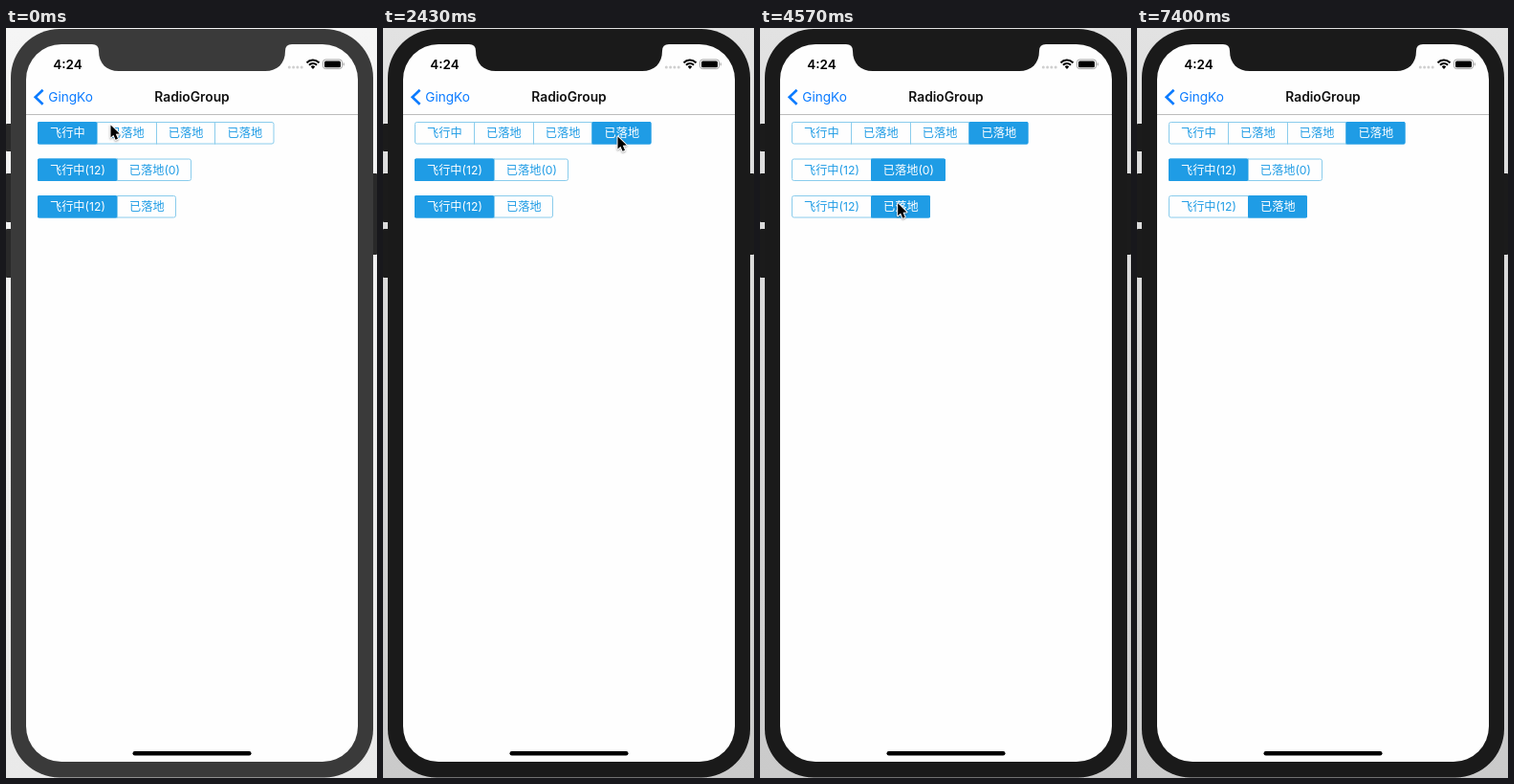
Write an HTML page with a canvas that moves like this. It is 388 by 784 pixels and loops after 7430 ms.

```html
<!DOCTYPE html>
<html lang="zh">
<head>
<meta charset="utf-8">
<title>RadioGroup</title>
<style>
  html, body { margin: 0; width: 100%; height: 100%; overflow: hidden; background: #fff; }
  canvas { display: block; width: 388px; height: 784px; }
</style>
</head>
<body>
<canvas id="stage"></canvas>
<script>
const W = 388, H = 784, LOOP = 7430;
const BLUE = '#1f9ce5', BORDER = '#8accec', TINT = '#0b7bff';
const LATIN = 'Inter, "Noto Sans", sans-serif';
const LABEL = '12.2px Inter, "Noto Sans CJK SC", "Noto Sans CJK", sans-serif';
const ACTIVATE_AT = 280;

const canvas = document.getElementById('stage');
const ctx = canvas.getContext('2d');
const ratio = window.devicePixelRatio || 1;
canvas.width = W * ratio;
canvas.height = H * ratio;

// picks: [time, selected index]
const groups = [
  { y: 98, edges: [33, 95, 157, 218.5, 280.5], labels: ['飞行中', '已落地', '已落地', '已落地'],
    picks: [[0, 0], [480, 1], [1230, 2], [1980, 3]] },
  { y: 136.5, edges: [33, 116, 194], labels: ['飞行中(12)', '已落地(0)'],
    picks: [[0, 0], [3430, 1], [5500, 0]] },
  { y: 175, edges: [33, 116, 178], labels: ['飞行中(12)', '已落地'],
    picks: [[0, 0], [4330, 1]] }
];

// pointer stops: [time, x, y]
const pointerPath = [
  [0, 109, 101], [120, 110, 105], [560, 112, 107], [930, 170, 110], [1350, 178, 112],
  [1800, 240, 113], [2430, 245, 113], [2650, 243, 115], [3080, 172, 145],
  [3550, 155, 147], [3900, 155, 163], [4130, 146, 182], [4550, 144, 183],
  [5030, 86, 157], [5300, 77, 144], [5770, 77, 142], [5880, 76, 143], [6130, -16, 170]
];

function box(x, y, w, h, r, fill) {
  ctx.beginPath();
  ctx.roundRect(x, y, w, h, r);
  ctx.fillStyle = fill;
  ctx.fill();
}

function text(str, x, y, font, color, align = 'center') {
  ctx.font = font;
  ctx.fillStyle = color;
  ctx.textAlign = align;
  ctx.fillText(str, x, y);
}

function drawPhone(active) {
  const back = ctx.createLinearGradient(0, 0, 0, H);
  back.addColorStop(0, active ? '#e2e2e2' : '#f5f5f5');
  back.addColorStop(1, active ? '#cacaca' : '#e9e9e9');
  ctx.fillStyle = back;
  ctx.fillRect(0, 0, W, H);

  const body = active ? '#1a1a1a' : '#3a3a3a';
  const button = active ? '#1b1b1b' : '#292929';
  for (const [y, h] of [[100, 29], [152, 51], [210, 51]]) box(0, y, 8, h, 1, button);
  box(381, 152, 7, 85, 1, button);
  box(5, 1, 379, 782.5, 51, body);
  box(21, 17, 347, 750, 37, '#fefefe');

  ctx.beginPath();
  ctx.moveTo(90, 16);
  ctx.lineTo(90, 17);
  ctx.quadraticCurveTo(97, 17, 97, 24);
  ctx.bezierCurveTo(97, 37, 105, 45, 118, 45);
  ctx.lineTo(271, 45);
  ctx.bezierCurveTo(284, 45, 292, 37, 292, 24);
  ctx.quadraticCurveTo(292, 17, 299, 17);
  ctx.lineTo(299, 16);
  ctx.fillStyle = body;
  ctx.fill();
}

function drawStatus() {
  text('4:24', 64.5, 43, '600 13.5px ' + LATIN, '#000');
  for (let i = 0; i < 4; i++) box(294.8 + i * 4.3, 39.5, 3, 3, 1.5, '#cfcfcf');

  ctx.strokeStyle = '#000';
  ctx.lineWidth = 2;
  for (const r of [5.5, 8.9]) {
    ctx.beginPath();
    ctx.arc(321, 42.5, r, -Math.PI * 0.76, -Math.PI * 0.24);
    ctx.stroke();
  }
  ctx.beginPath();
  ctx.moveTo(321, 43);
  ctx.arc(321, 42.5, 3, -Math.PI * 0.76, -Math.PI * 0.24);
  ctx.fillStyle = '#000';
  ctx.fill();

  ctx.beginPath();
  ctx.roundRect(331.5, 33, 20, 9.6, 2.8);
  ctx.lineWidth = 0.9;
  ctx.strokeStyle = '#999';
  ctx.stroke();
  box(333, 34.4, 17, 6.8, 1.5, '#000');
  box(352.6, 36.2, 1.2, 3.2, 0.6, '#aaa');
}

function drawHeader() {
  ctx.fillStyle = '#bcbcbc';
  ctx.fillRect(21, 90, 347, 1);
  ctx.beginPath();
  ctx.moveTo(38.6, 64.8);
  ctx.lineTo(30.7, 72.3);
  ctx.lineTo(38.6, 79.8);
  ctx.strokeStyle = TINT;
  ctx.lineWidth = 2.6;
  ctx.stroke();
  text('GingKo', 44.3, 77, '13.6px ' + LATIN, TINT, 'left');
  text('RadioGroup', 194.5, 77, '600 13.8px ' + LATIN, '#111');
}

function drawGroup({ y, edges, labels, picks }, t) {
  const selected = picks.filter(p => p[0] <= t).pop()[1];
  const left = edges[0], right = edges[edges.length - 1], height = 23.5;

  ctx.save();
  ctx.beginPath();
  ctx.roundRect(left, y, right - left, height, 2);
  ctx.clip();
  ctx.fillStyle = BLUE;
  ctx.fillRect(edges[selected], y, edges[selected + 1] - edges[selected], height);
  ctx.restore();

  ctx.strokeStyle = BORDER;
  ctx.lineWidth = 1;
  ctx.beginPath();
  ctx.roundRect(left + 0.5, y + 0.5, right - left - 1, height - 1, 2);
  for (const x of edges.slice(1, -1)) {
    ctx.moveTo(Math.floor(x) + 0.5, y);
    ctx.lineTo(Math.floor(x) + 0.5, y + height);
  }
  ctx.stroke();

  const x = edges[selected];
  box(x, y, edges[selected + 1] - x, height, 1.5, BLUE);
  labels.forEach((label, i) => {
    text(label, (edges[i] + edges[i + 1]) / 2 + 0.4, y + 16.3, LABEL, i === selected ? '#fff' : BLUE);
  });
}

function pointerAt(t) {
  const next = pointerPath.findIndex(p => p[0] > t);
  if (next < 0) return null;
  const [t0, x0, y0] = pointerPath[next - 1], [t1, x1, y1] = pointerPath[next];
  const u = (t - t0) / (t1 - t0), ease = u * u * (3 - 2 * u);
  return [x0 + (x1 - x0) * ease, y0 + (y1 - y0) * ease];
}

function drawPointer(t) {
  const at = pointerAt(t);
  if (!at) return;
  ctx.save();
  ctx.translate(at[0], at[1]);
  ctx.beginPath();
  ctx.moveTo(0.5, 0.5);
  for (const [x, y] of [[0.5, 13.4], [3.4, 10.7], [5.6, 15.8], [8, 14.8], [5.8, 9.8], [9.8, 9.6]]) {
    ctx.lineTo(x, y);
  }
  ctx.closePath();
  ctx.lineJoin = 'round';
  ctx.lineWidth = 2;
  ctx.strokeStyle = '#fff';
  ctx.shadowColor = 'rgba(0,0,0,.35)';
  ctx.shadowBlur = 2 * ratio;
  ctx.shadowOffsetY = ratio;
  ctx.stroke();
  ctx.shadowColor = 'transparent';
  ctx.fillStyle = '#000';
  ctx.fill();
  ctx.restore();
}

function draw(t) {
  ctx.setTransform(ratio, 0, 0, ratio, 0, 0);
  drawPhone(t >= ACTIVATE_AT);
  drawStatus();
  drawHeader();
  groups.forEach(group => drawGroup(group, t));
  box(132.5, 756, 124, 4.4, 2.2, '#000');
  drawPointer(t);
}

const start = performance.now();
function tick() {
  draw((performance.now() - start) % LOOP);
  requestAnimationFrame(tick);
}
tick();
</script>
</body>
</html>
```
